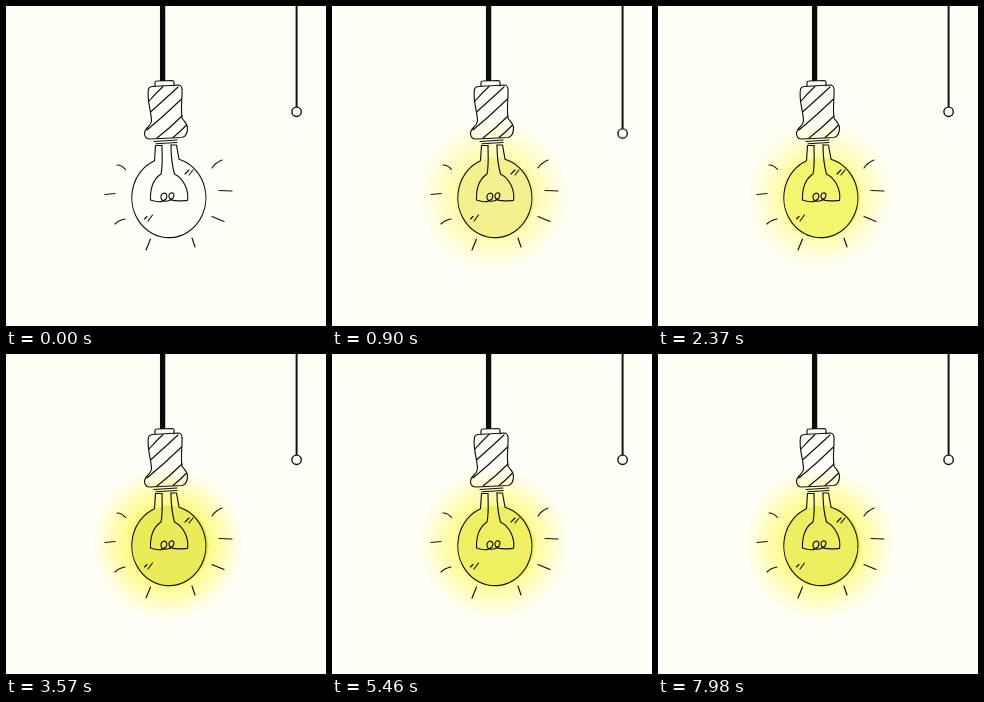
An HTML page without scripts that plays this animation: 320 by 320 pixels, repeating every 8000 ms.

```html
<!DOCTYPE html>
<html lang="en">
<head>
<meta charset="utf-8">
<title>Light bulb</title>
<style>
  html, body { margin: 0; width: 100%; height: 100%; overflow: hidden; background: #fffff8; }
  svg { display: block; width: 100vw; height: 100vh; }
  .ink { fill: none; stroke: #111; stroke-width: 1.15; stroke-linecap: round; stroke-linejoin: round; }
  .pull { animation: pull 8s infinite; }
  .light { animation: switch-on 8s linear infinite; }
  .surge { animation: surge 8s ease-in-out infinite; }

  @keyframes pull {
    0%, 3% { transform: translateY(0); animation-timing-function: ease-in-out; }
    11% { transform: translateY(21.7px); animation-timing-function: ease-in-out; }
    19%, 100% { transform: translateY(0); }
  }
  @keyframes switch-on {
    0%, 3% { opacity: 0; }
    15%, 100% { opacity: 1; }
  }
  /* 1.2 s each way; the last swing is cut by the loop */
  @keyframes surge {
    0%, 30%, 60% { opacity: 0; }
    15%, 45%, 75% { opacity: 1; }
    90% { opacity: 0; animation-timing-function: cubic-bezier(.45, 0, .7, .6); }
    100% { opacity: .75; }
  }
</style>
</head>
<body>
<svg viewBox="0 0 320 320">
  <defs>
    <radialGradient id="soft">
      <stop offset=".5" stop-color="#fdfc8c" stop-opacity=".75"/>
      <stop offset=".68" stop-color="#fefd9c" stop-opacity=".52"/>
      <stop offset=".84" stop-color="#fffeb0" stop-opacity=".25"/>
      <stop offset="1" stop-color="#fffec0" stop-opacity="0"/>
    </radialGradient>
    <radialGradient id="strong">
      <stop offset=".5" stop-color="#fbf970" stop-opacity=".6"/>
      <stop offset=".7" stop-color="#fdfb88" stop-opacity=".38"/>
      <stop offset=".86" stop-color="#fffda0" stop-opacity=".16"/>
      <stop offset="1" stop-color="#fffec0" stop-opacity="0"/>
    </radialGradient>
    <ellipse id="glass" cx="164.500" cy="191.500" rx="38" ry="40"/>
  </defs>

  <g class="light">
    <circle cx="162" cy="189.500" r="77" fill="url(#soft)"/>
    <g class="surge"><circle cx="162" cy="190" r="79" fill="url(#strong)"/></g>
    <use href="#glass" fill="#f3f770"/>
    <g class="surge"><use href="#glass" fill="#ebea5a"/></g>
  </g>

  <path d="M156.600 0V75" stroke="#0a0a08" stroke-width="5.300"/>

  <g class="ink">
    <path d="M149 80V76.500Q149 75 151 75L166 74.500Q168 74.500 168 76.500V80"/>
    <path d="M142.500 83Q143 81 146 80.500L172 79Q175.500 79 176 83C176.500 91 174.500 102 176 112C177.500 115 181.500 117 181.500 122C181.500 127 180 130.500 176 131.500L144 133Q139 133 138.500 128C138 122 145 121 145.500 115C145.500 105 140.500 95 142.500 83Z"/>
    <path d="M143 95Q149 88 157 80.500M144.500 106Q158 94 172 81M141 124Q158 110 175.500 93M151 132Q164 122 176 110M167 131.500Q174 126 180.500 119"/>
    <path d="M148 135.500L171 134M150 137.700L171 136.500"/>
    <path d="M156 139.500H149.500L148.500 154.800A37 40 0 1 0 173 153.200L170.500 139H165"/>
    <path d="M156 139.500C156 149 157 159 155 168C149 172 144 180 144.500 194C150 196 156 197 160 193C163 187 157 185 155 190C154 196 162 197 167 192C170 187 165 185 163 189C162 196 171 195 181.500 194.500C183 184 178 173 168.500 168C166 159 165 150 165 139"/>
    <path d="M179 168L183 164M183 169L187 164M138.500 213L141 210.500M142 215L146.500 209"/>
    <path d="M111 159Q116 159 119.500 163.500M99 188.500L109 187.500M109 218Q113 214 119 213M140 244L144.500 233M186 232L189 241M206 210.500L218 215.500M213 184.500L226 185M206 162Q209 157 216 154"/>
  </g>

  <g class="pull">
    <path d="M290.600 -30V101" stroke="#111" stroke-width="2"/>
    <circle cx="290.600" cy="105.800" r="4.700" fill="#fffff8" stroke="#111" stroke-width="1.400"/>
  </g>
</svg>
</body>
</html>
```
